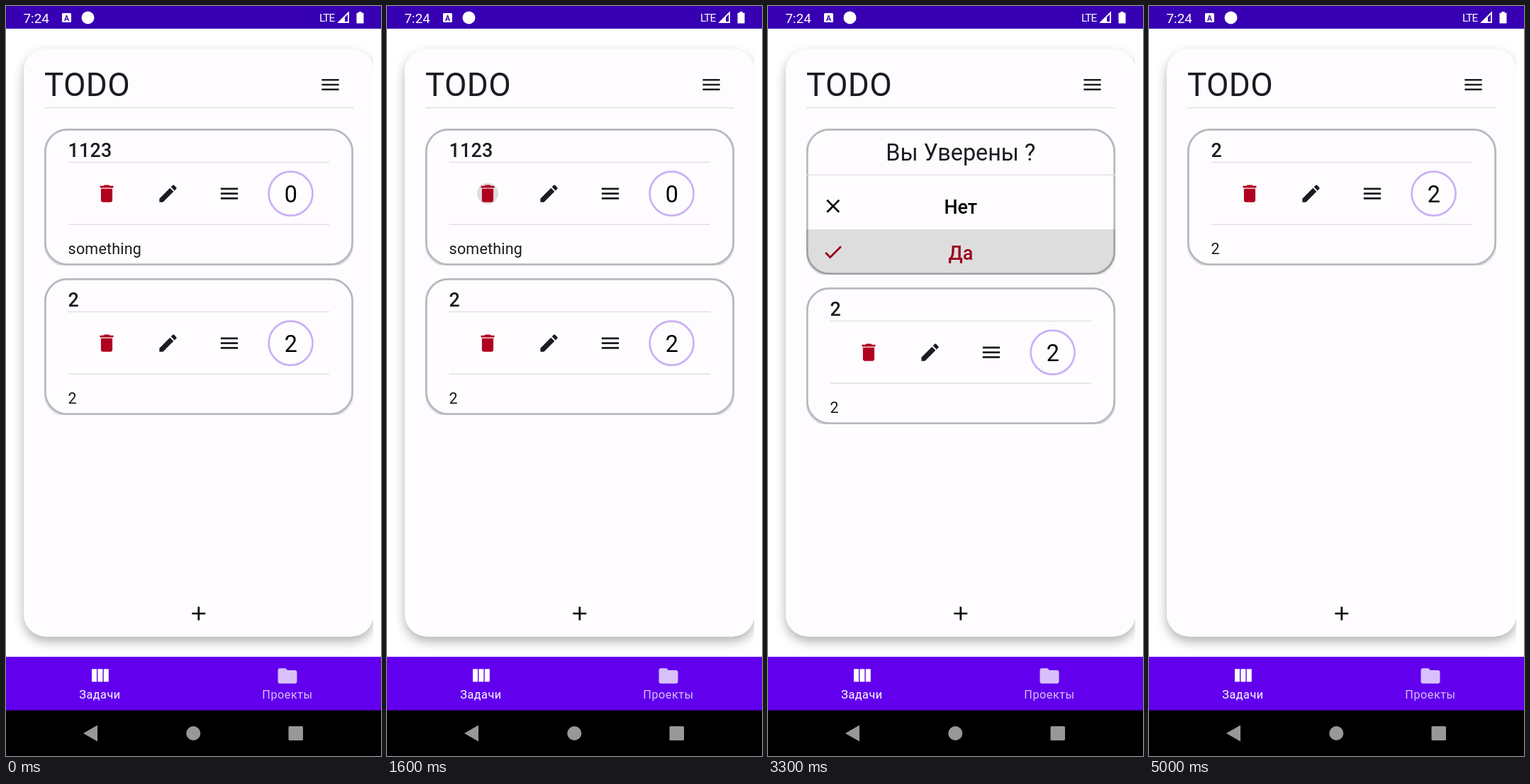
Write an HTML page that moves like this. It is 529x1058 px and loops after 5500 ms.

```html
<!DOCTYPE html>
<html lang="ru">
<head>
<meta charset="utf-8">
<title>TODO</title>
<style>
  html, body { margin: 0; width: 100%; height: 100%; overflow: hidden; background: #fff; }
  svg { display: block; width: 100%; height: 100%; }
  text { font-family: Roboto, "Noto Sans", sans-serif; white-space: pre; }
</style>
</head>
<body>
<svg id="stage" viewBox="0 0 529 1058" xmlns="http://www.w3.org/2000/svg"></svg>
<script>
const LOOP = 5500, DP = 1.347;
const CARD = { x: 54, y: 173, w: 436, short: 193, tall: 206, step: 211 };
const INK = '#1c1b1f', RED = '#b00020', SURFACE = '#fefcfe', PALE = '#d8c0fb';

const ICONS = {
  menu: 'M3 18h18v-2H3zm0-5h18v-2H3zm0-7v2h18V6z',
  trash: 'M6 19c0 1.1.9 2 2 2h8c1.1 0 2-.9 2-2V7H6zM19 4h-3.5l-1-1h-5l-1 1H5v2h14z',
  pencil: 'M3 17.25V21h3.75L17.81 9.94l-3.75-3.75zM20.71 7.04c.39-.39.39-1.02 0-1.41l-2.34-2.34c-.39-.39-1.02-.39-1.41 0l-1.83 1.83 3.75 3.75z',
  close: 'M19 6.41L17.59 5 12 10.59 6.41 5 5 6.41 10.59 12 5 17.59 6.41 19 12 13.41 17.59 19 19 17.59 13.41 12z',
  check: 'M9 16.17L4.83 12l-1.42 1.41L9 19 21 7l-1.41-1.41z',
  plus: 'M19 13h-6v6h-2v-6H5v-2h6V5h2v6h6z',
  folder: 'M10 4H4c-1.1 0-2 .9-2 2v12c0 1.1.9 2 2 2h16c1.1 0 2-.9 2-2V8c0-1.1-.9-2-2-2h-8z'
};

const icon = (name, x, y, fill = INK, scale = DP) =>
  `<path d="${ICONS[name]}" fill="${fill}" transform="translate(${x} ${y}) scale(${scale}) translate(-12 -12)"/>`;
const rect = (x, y, w, h, fill, extra = '') =>
  `<rect x="${x}" y="${y}" width="${w}" height="${h}" fill="${fill}" ${extra}/>`;
const divider = (x, y, w) => rect(x, y - 0.7, w, 1.4, '#e0dee1');
const label = (str, x, y, size, { fill = INK, weight = 400, spacing = 0, anchor = 'start' } = {}) =>
  `<text x="${x}" y="${y}" font-size="${size}" fill="${fill}" font-weight="${weight}" letter-spacing="${spacing}" text-anchor="${anchor}">${str}</text>`;

const outline = (id = '') => `<rect ${id && `id="${id}"`} x="1.35" y="1.35" width="${CARD.w - 2.7}"
  height="${CARD.short - 2.7}" rx="31" fill="${SURFACE}" stroke="#b9b8bc" stroke-width="2.8" filter="url(#cardShadow)"/>`;

const taskPage = (title, body, count, ripple = '') =>
  label(title, 33.6, 40, 26.9, { weight: 500, spacing: 0.2 }) +
  divider(33.6, 47.4, 368.5) + ripple +
  icon('trash', 88, 91.6, RED) + icon('pencil', 174.5, 91.6) + icon('menu', 261, 91.6) +
  `<circle cx="347.6" cy="91.6" r="31" fill="none" stroke="#cbb0f5" stroke-width="2.7"/>` +
  label(count, 347.8, 104, 32.3, { fill: '#000', anchor: 'middle' }) +
  divider(33.6, 135.2, 368.5) +
  label(body, 33.6, 177, 21.5, { spacing: 0.2 });

const confirmPage = () =>
  label('Вы Уверены ?', 217.8, 45, 32.3, { anchor: 'middle' }) +
  divider(0, 65.3, CARD.w) +
  icon('close', 37.8, 109.3, '#000') +
  label('Нет', 217.8, 120, 26.9, { fill: '#000', weight: 500, anchor: 'middle' }) +
  icon('check', 37.8, 174, RED) +
  label('Да', 217.8, 184.5, 26.9, { fill: RED, weight: 500, anchor: 'middle' }) +
  rect(0, 142, CARD.w, 64, '#000', 'id="yesPress" opacity="0"');

const statusBar = () =>
  rect(0, 0, 529, 32, '#3700b3') +
  label('7:24', 24.5, 23.5, 18.9, { fill: '#fff' }) +
  rect(79, 10, 13, 13, '#fff', 'rx="1.5"') +
  label('A', 85.5, 20.5, 10.5, { fill: '#3700b3', weight: 700, anchor: 'middle' }) +
  '<circle cx="115.5" cy="16.5" r="9" fill="#fff"/>' +
  label('LTE', 442, 22, 15.5, { fill: '#fff', spacing: -1 }) +
  '<path d="M469.5 23L483 9.5V23z" fill="none" stroke="#fff" stroke-width="1.9"/>' +
  '<path d="M468 24l10-10v10z" fill="#fff"/>' +
  '<path d="M497.3 8h4.4v1.7h2.8V24.5h-10V9.7h2.8z" fill="#fff"/>';

const bottomBars = () =>
  rect(0, 918, 529, 76, '#6200ee') +
  [121, 129.4, 137.8].map(x => rect(x, 935.3, 7, 18, '#fff')).join('') +
  icon('folder', 397, 945, PALE) +
  label('Задачи', 132.5, 977.3, 16.2, { fill: '#fff', spacing: 0.54, anchor: 'middle' }) +
  label('Проекты', 397, 977.3, 16.2, { fill: PALE, spacing: 0.54, anchor: 'middle' }) +
  rect(0, 993.5, 529, 65, '#000') +
  '<g fill="#98979a"><path d="M109 1026l20-11.5v23z"/><circle cx="264.3" cy="1026" r="10"/>' +
  '<rect x="398.5" y="1016" width="20.5" height="20" rx="1.5"/></g>';

const stage = document.getElementById('stage');
stage.innerHTML = `
  <defs>
    <filter id="panelShadow" x="-10%" y="-10%" width="120%" height="120%">
      <feDropShadow dx="0" dy="7" stdDeviation="7.5" flood-color="#000" flood-opacity=".3"/>
    </filter>
    <filter id="cardShadow" x="-5%" y="-5%" width="110%" height="115%">
      <feDropShadow dx="0" dy="1.5" stdDeviation="1.3" flood-color="#000" flood-opacity=".2"/>
    </filter>
    <clipPath id="panelClip"><rect x="11" y="32" width="507" height="886"/></clipPath>
    <clipPath id="boxClip"><rect id="box" width="${CARD.w}" height="${CARD.short}"/></clipPath>
    <clipPath id="shortBox"><rect width="${CARD.w}" height="${CARD.short}"/></clipPath>
    <clipPath id="roundClip"><rect id="round" width="${CARD.w}" height="${CARD.short}" rx="32"/></clipPath>
  </defs>
  ${rect(0, 0, 529, 1058, '#fff')}
  <g clip-path="url(#panelClip)">${rect(25, 60.5, 493.5, 829, SURFACE, 'rx="32" filter="url(#panelShadow)"')}</g>
  ${label('TODO', 53.9, 127, 45.8, { spacing: 0.34 })}
  ${icon('menu', 457.5, 111)}
  ${divider(54, 143.6, CARD.w)}
  <g transform="translate(${CARD.x} ${CARD.y})" clip-path="url(#boxClip)">
    ${outline('frame')}
    <g clip-path="url(#roundClip)">
      <g id="pages">
        <g>${taskPage('1123', 'something', '0', '<circle id="trashPress" cx="88" cy="91.6" r="32" opacity="0"/>')}</g>
        <g transform="translate(${CARD.w})">${confirmPage()}</g>
        <g transform="translate(${2 * CARD.w})">${taskPage('2', '2', '2')}</g>
      </g>
    </g>
  </g>
  <g id="second" clip-path="url(#shortBox)">${outline()}${taskPage('2', '2', '2')}</g>
  ${icon('plus', 271.8, 857, '#000')}
  ${statusBar()}
  ${bottomBars()}`;

const el = Object.fromEntries(
  ['box', 'round', 'frame', 'pages', 'second', 'trashPress', 'yesPress'].map(id => [id, document.getElementById(id)]));
const set = (node, name, value) => node.setAttribute(name, value);
const clamp01 = v => Math.min(1, Math.max(0, v));

// Critically damped spring, stiffness 400
const spring = (t, start) => {
  const w = Math.max(0, t - start) * 0.02;
  return 1 - (1 + w) * Math.exp(-w);
};
const press = (t, down, up) => 0.125 * clamp01((t - down) / 50) * clamp01(1 - (t - up) / 150);

const GROW = 1765, TO_CONFIRM = 1834, TO_NEXT = 3734, SHRINK = 4230;

function draw(t) {
  const tall = t >= GROW && t < SHRINK;
  const height = tall ? CARD.tall : CARD.short;
  const growth = (CARD.tall - CARD.short) * spring(t, GROW);
  const slide = t >= SHRINK ? 2 : spring(t, TO_CONFIRM) + spring(t, TO_NEXT);

  set(el.box, 'height', tall ? CARD.short + growth : height);
  set(el.round, 'height', height);
  set(el.frame, 'height', height - 2.7);
  set(el.pages, 'transform', `translate(${-CARD.w * slide})`);
  set(el.second, 'transform', `translate(${CARD.x} ${CARD.y + CARD.step + growth})`);
  set(el.second, 'visibility', t < TO_NEXT ? 'visible' : 'hidden');
  set(el.trashPress, 'opacity', press(t, 1550, 1790));
  set(el.trashPress, 'r', 10 + 22 * clamp01((t - 1550) / 225));
  set(el.yesPress, 'opacity', press(t, 3240, 3688));
}

const begin = performance.now();
function tick() {
  draw((performance.now() - begin) % LOOP);
  requestAnimationFrame(tick);
}
draw(0);
requestAnimationFrame(tick);
</script>
</body>
</html>
```
